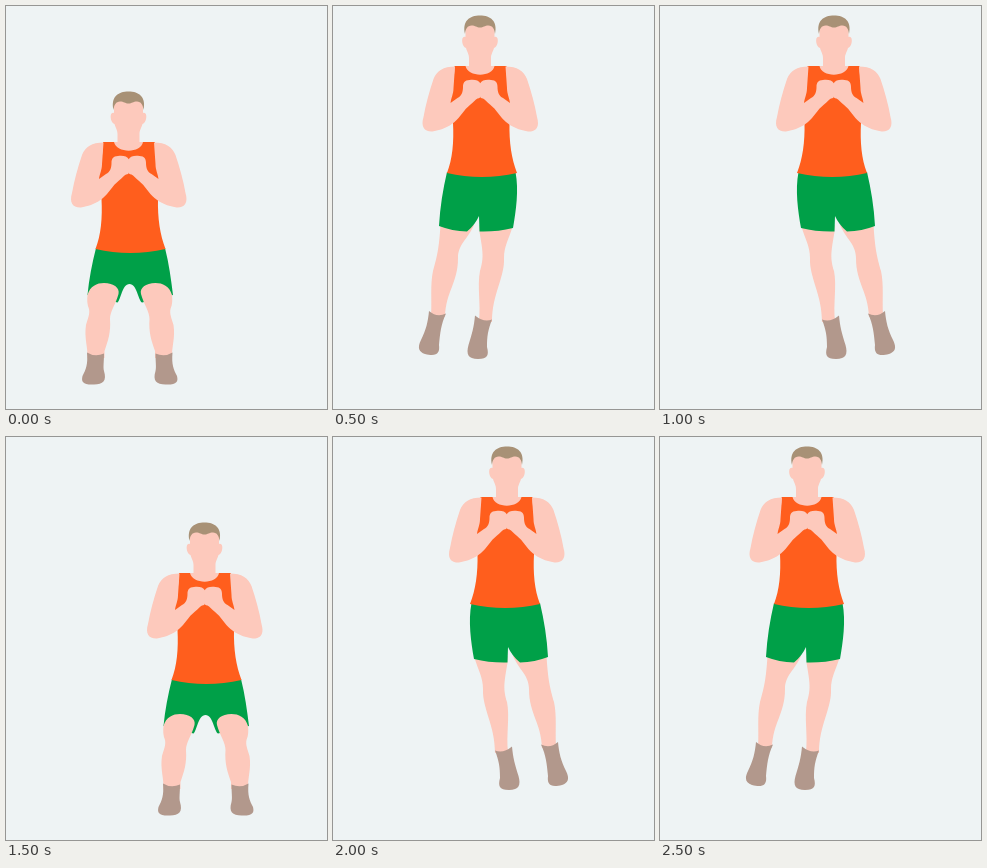
Recreate the animation shown at these times as an HTML page. Size 321 by 403 pixels, loop 3 s.

```html
<!DOCTYPE html>
<html lang="en">
<head>
<meta charset="utf-8">
<title>Side jump squat</title>
<style>
  html, body { margin: 0; width: 100%; height: 100%; overflow: hidden; background: #eef3f4; }
  svg { display: block; width: 321px; height: 403px; }
  .skin { fill: #fdc9bc; }
  .shirt { fill: #ff5e1d; }
  .shorts { fill: #00a048; }
  .shoe { fill: #b2988c; }
  .hair { fill: #a89176; }
</style>
</head>
<body>
<svg viewBox="0 0 321 403">
  <defs>
    <path id="arm" class="skin" d="M97.500 136.500C86 136.500 79 141 76 149C72 161 68 175 66 187C63 197 67 202 75 201.500C84 200 91 197 97 192C103 187 106 180 113 174.500C116 172 118 169.500 120 168.500Q123 168 123 166V153.500C121 150 117 149.500 112 150C107 150 105.500 153 105.500 157C105.500 162 104 166 100 168L93 173C93.500 168 96 164 96 158Z"/>
    <g id="squatLeg">
      <path class="skin" d="M81.500 289C84 280 91 277 98 277C108 277 114 282 112.500 288C110 298 104 305 104 313C105 326 102 335 98.500 345V352H81.500C82 341 78 332 80 319C82 312 84 308 83 303C81 298 81 294 81.500 289Z"/>
      <path class="shoe" d="M81 346.500Q89 351.500 98 347.500C98 356 97 361 98 365C101 375 97 378.500 88 378.500C77 379 75 376 76.500 370C80 363 82 359 81 346.500Z"/>
    </g>
    <g id="upper">
      <path class="shirt" d="M97 136H110C113 146 133 146 136 136H149C149 153 152 164 153 172L152 193C151.500 212 154 229 159.500 243Q124 251 89.500 243C95 229 96.500 212 95.500 193L92.500 174C93 162 97 151 97 136Z"/>
      <path class="skin" d="M108 97C109 91 136 91 137 97V107C142 105 141 117 136.500 118C135 123 133.500 124 133.500 128V136H137C135 147.500 110.500 147.500 108 136H111.500V128C111.500 124 110 123 108.500 118C104 117 103 105 108 107Z"/>
      <path class="hair" d="M107.500 104C104.500 91 112 85.500 122.500 85.500S140.500 91 137.500 104C137 99 135 95.500 131 95.500C127 95.500 126 97.500 122.500 97.500S118 95.500 114 95.500C110 95.500 108 99 107.500 104Z"/>
      <use href="#arm"/>
      <use href="#arm" transform="matrix(-1 0 0 1 245.500 0)"/>
    </g>
    <g id="squat">
      <path class="shorts" d="M90 242H159C163 258 165 273 167 289L136 296.500C132 294 131 278 123.500 278S115 294 111.500 296.500L81.500 289C83 273 86 258 90 242Z"/>
      <use href="#squatLeg"/>
      <use href="#squatLeg" transform="matrix(-1 0 0 1 247.500 0)"/>
      <use href="#upper"/>
    </g>
    <g id="jump">
      <path class="skin" d="M141 219C145 233 150 240 150 252C149 271 162 288 162 316L175 315C173 298 177 280 174 265C170 252 171 246 174.500 226V219Z"/>
      <path class="skin" d="M180 219C186 233 196 238 196 252C196 277 208 285 209 311L223 310C222 294 224 279 221 265C217 251 215 243 213.500 219Z"/>
      <path class="shoe" d="M162 313.500Q170 317 179 309.500C180 321 182 328 185.500 339C188 348 186 353 176 353C166 353 165 349 167 341C167 330 166 324 162 313.500Z"/>
      <path class="shoe" d="M208 307.500Q217 312 225 305C226 316 228 324 233 334C237 342 235 346 229 348C217 351 214 347 215 339C214 328 213 318 208 307.500Z"/>
      <path class="shorts" d="M138.500 166H207C211 183 214 201 215 220Q202 225 187 225.500Q179 219 175 210L174.500 225.500Q157 226 141 222C138 205 135 184 138.500 166Z"/>
      <use href="#upper" transform="matrix(-1 0 0 1 296.500 -76)"/>
    </g>
  </defs>
  <use id="figure"/>
</svg>
<script>
  const STEP = 500;
  const MIRROR = 'matrix(-1 0 0 1 321 0)';
  const poses = [
    ['#squat', ''], ['#jump', MIRROR], ['#jump', ''],
    ['#squat', 'translate(76 0)'], ['#jump', ''], ['#jump', MIRROR]
  ];
  const figure = document.getElementById('figure');
  const start = performance.now();

  function draw(now) {
    const elapsed = Math.max(0, now - start);
    const [pose, transform] = poses[Math.floor(elapsed / STEP) % poses.length];
    figure.setAttribute('href', pose);
    figure.setAttribute('transform', transform);
    requestAnimationFrame(draw);
  }
  draw(start);
</script>
</body>
</html>
```
